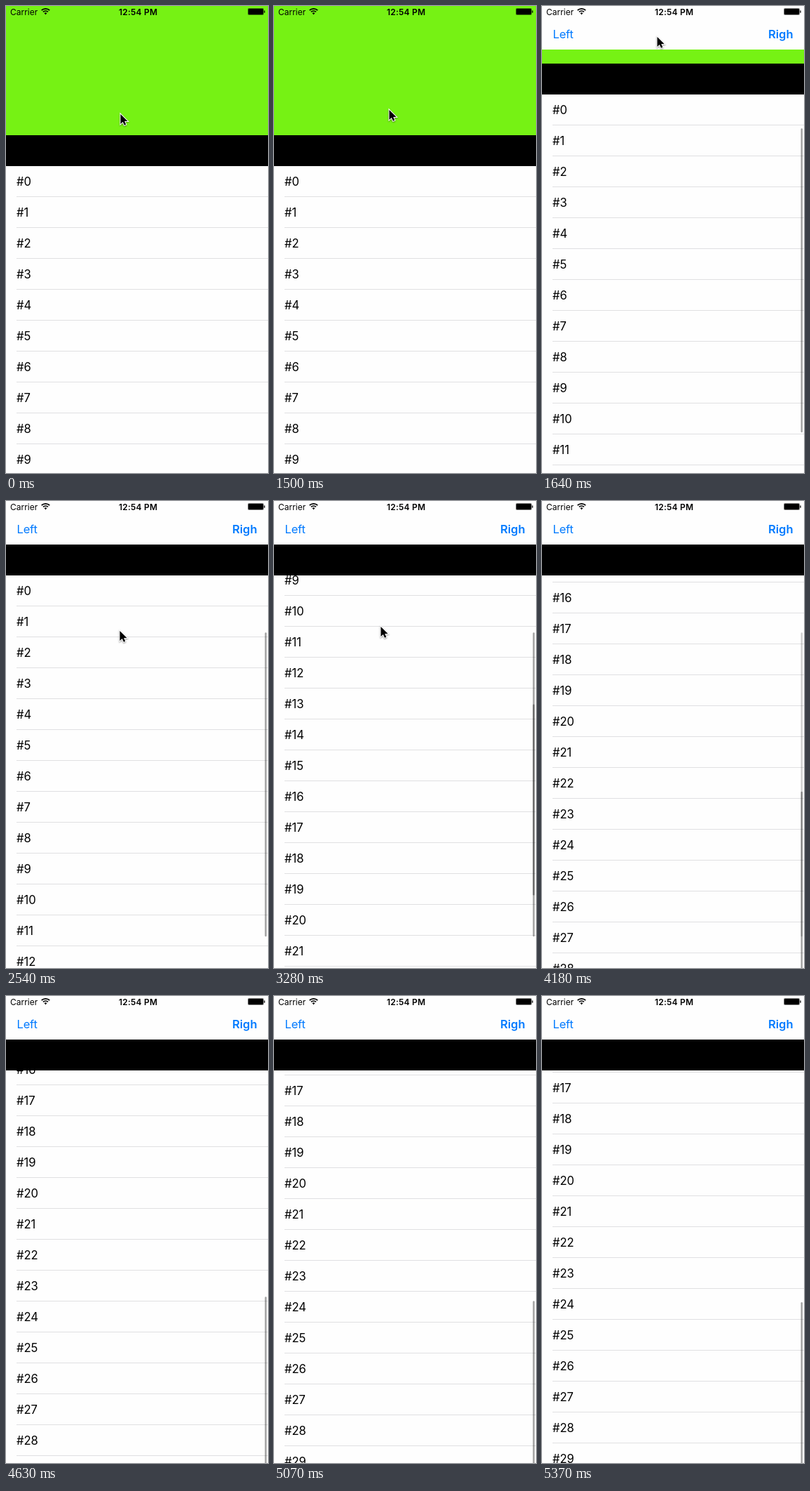
Animation of 374 by 665 pixels, one loop 5.47 s. Source, as an HTML page with a canvas:

```html
<!DOCTYPE html>
<html lang="en">
<head>
<meta charset="utf-8">
<title>Sticky header scroll</title>
<style>
  html, body { margin: 0; width: 100%; height: 100%; overflow: hidden; background: #fefefe; }
  canvas { display: block; }
</style>
</head>
<body>
<canvas id="stage" width="374" height="665"></canvas>
<script>
const W = 374, H = 665, LOOP = 5470;
const ROW = 44, STRIP = 44, NAV = 62, HEADER = 184;
const COLLAPSE = HEADER - NAV;      // how far the green header scrolls away
const DRAG_START = 1488, TICK = 148.9; // the picture updates once per tick
const FLICK = 10, RELEASE = 15, DECAY = 0.7405; // in ticks; momentum kept per tick
const ctx = document.getElementById('stage').getContext('2d');

const clamp = (v, lo, hi) => Math.min(hi, Math.max(lo, v));

function rect(x, y, w, h, color) {
  ctx.fillStyle = color;
  ctx.fillRect(x, y, w, h);
}

function label(text, x, y, size, color = '#000', weight = 400, spacing = 0) {
  ctx.font = `${weight} ${size}px Inter, sans-serif`;
  ctx.letterSpacing = spacing + 'px';
  ctx.fillStyle = color;
  ctx.fillText(text, x, y);
}

function pill(x, y, w, h, r, color) {
  ctx.fillStyle = color;
  ctx.beginPath();
  ctx.roundRect(x, y, w, h, r);
  ctx.fill();
}

const scrollBar = (y, length, alpha = 1) =>
  pill(369.5, y, 2.5, length, 1.25, `rgba(0,0,0,${0.36 * alpha})`);

function drawList(top, offset) {
  for (let n = Math.floor(offset / ROW); top + n * ROW - offset < H; n++) {
    const y = top + n * ROW - offset;
    label('#' + n, 15, y + 28, 16.7, '#000', 400, -0.1);
    rect(15, y + ROW - 1, W - 15, 1, '#e0e0e2');
  }
}

function wifiArc(radius) {
  ctx.beginPath();
  ctx.arc(56.5, 12, radius, -Math.PI * 0.75, -Math.PI * 0.25);
}

function drawStatusBar() {
  label('Carrier', 6, 12.5, 12);
  label('12:54 PM', 161, 12.5, 12, '#000', 600, 0.2);

  ctx.strokeStyle = ctx.fillStyle = '#000';
  ctx.lineWidth = 1.7;
  for (const radius of [5, 8.2]) {
    wifiArc(radius);
    ctx.stroke();
  }
  wifiArc(2.7);
  ctx.lineTo(56.5, 12.4);
  ctx.fill();

  pill(345, 3, 23, 10, 2, 'rgba(0,0,0,.5)');
  pill(346, 4, 21, 8, 1, '#000');
  pill(368.3, 6.3, 1.3, 3.5, 0.6, '#000');
}

const arrow = new Path2D('M1.5 1V15L4.8 12L7 16.8L9.3 15.8L7.2 11.1H11.6Z');

function drawCursor(x, y) {
  ctx.save();
  ctx.translate(x, y);
  ctx.shadowColor = 'rgba(0,0,0,.4)';
  ctx.shadowBlur = 2;
  ctx.shadowOffsetY = 1;
  ctx.lineWidth = 2;
  ctx.strokeStyle = '#fff';
  ctx.stroke(arrow);
  ctx.shadowColor = 'transparent';
  ctx.fillStyle = '#000';
  ctx.fill(arrow);
  ctx.restore();
}

// Drag up, move down to the list, then flick up.
function cursorAt(t, tick) {
  if (tick >= FLICK) return [151, 178];
  if (tick >= 8) return [150, 270];
  if (tick >= 7) return [161, 184];
  if (tick >= 1) return [163, 43];
  return t < 450 ? [162, 153] : [163, t < 1500 ? 156 : 147];
}

function draw(t) {
  const tick = Math.max(0, Math.floor((t - DRAG_START) / TICK));
  const header = Math.min(COLLAPSE, 102 * tick);
  const offset = tick < FLICK ? 0 : Math.round(750 - 618 * DECAY ** (tick - FLICK));
  const outerAlpha = header ? clamp((19 - tick) / 2, 0, 1) : 0;
  const stripY = HEADER - header;

  rect(0, 0, W, H, '#fefefe');
  drawList(stripY + STRIP, offset);
  rect(0, 0, W, stripY, '#76f214');
  rect(0, stripY, W, STRIP, '#000');
  if (header) {
    rect(0, 0, W, NAV, '#fefefe');
    label('Left', 15.5, 46, 16.5, '#007aff', 400, -0.2);
    label('Righ', 323, 46, 16.5, '#007aff', 600);
  }
  drawStatusBar();
  if (outerAlpha) scrollBar(108 + header * 0.65, 433, outerAlpha);
  if (offset) scrollBar(109 + offset * 0.439, 272);
  if (tick < RELEASE) drawCursor(...cursorAt(t, tick));
}

const start = performance.now();
function animate() {
  draw((performance.now() - start) % LOOP);
  requestAnimationFrame(animate);
}
animate();
</script>
</body>
</html>
```
